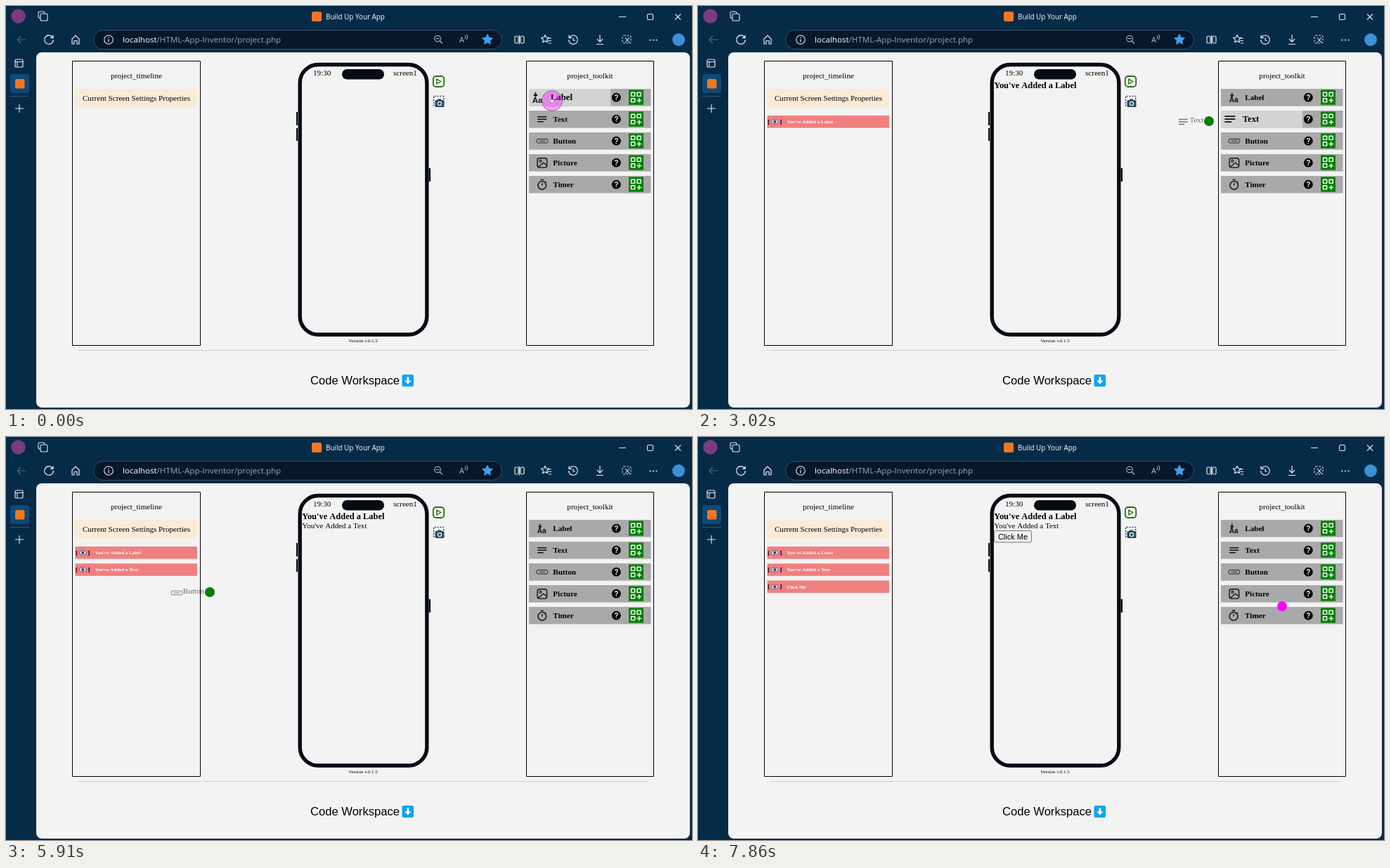
An HTML page with a canvas that plays this animation: 976x574 px, repeating every 8 s.

```html
<!DOCTYPE html>
<html lang="en">
<head>
<meta charset="utf-8">
<title>Build Up Your App</title>
<style>
  html, body { margin: 0; width: 100%; height: 100%; overflow: hidden; background: #052b47; }
  canvas { display: block; }
</style>
</head>
<body>
<canvas id="stage" width="976" height="574"></canvas>
<script>
const c = document.getElementById('stage').getContext('2d');
const LOOP = 8000;
const SERIF = '"Liberation Serif", "Times New Roman", serif';
const SANS = '"Liberation Sans", Arial, sans-serif';
const UI = '"Open Sans", "Noto Sans", sans-serif';
const PAGE = '#f3f3f3', INK = '#050c14', CHROME = '#e4eaef';

// Pointer positions: time, x, y. Each one holds until the next.
const PATH = [
  [0, 777, 135], [370, 765, 134], [490, 739, 139], [640, 713, 141], [790, 650, 146],
  [910, 601, 150], [1060, 561, 151], [1210, 531, 154], [1890, 597, 160], [2040, 685, 158],
  [2190, 783, 165], [2340, 804, 166], [2610, 803, 166], [2900, 775, 165], [3020, 727, 164],
  [3160, 700, 165], [3280, 650, 167], [3400, 590, 169], [3520, 534, 171], [4230, 570, 172],
  [4350, 618, 174], [4500, 690, 174], [4630, 770, 183], [4760, 781, 188], [4910, 774, 188],
  [5280, 772, 189], [5400, 680, 194], [5520, 589, 201], [5670, 490, 208], [5790, 390, 215],
  [5910, 290, 221], [6040, 205, 226], [6160, 171, 227], [6280, 211, 226], [7310, 448, 243],
  [7460, 725, 245], [7610, 833, 245], [7730, 832, 243], [7860, 831, 241]
];
const DRAGS = [
  { press: 120, lift: 370, drop: 1340 },
  { press: 2610, lift: 2900, drop: 3800 },
  { press: 4910, lift: 5280, drop: 6680 }
];
const HOVERS = [
  { on: 0, lit: 0, out: 640, end: 790 },
  { on: 2190, lit: 2900, out: 3160, end: 3280 },
  { on: 4630, lit: 4760, out: 5520, end: 5670 }
];
// Times at which the pointer starts growing, is full, and shrinks back.
const GROWS = [[0, 0, 490], [2190, 2340, 3020], [4630, 4760, 5400], [6680, 6810, 7310]];

const TOOLS = ['Label', 'Text', 'Button', 'Picture', 'Timer'];
const ITEMS = ["You've Added a Label", "You've Added a Text", 'Click Me'];

const within = (t, a, b) => t >= a && t < b;

function text(s, x, y, font, color = '#000', align = 'left') {
  c.font = font;
  c.fillStyle = color;
  c.textAlign = align;
  c.fillText(s, x, y);
}
function rect(x, y, w, h, color) {
  c.fillStyle = color;
  c.fillRect(x, y, w, h);
}
function paint(fill, stroke, width = 1) {
  if (fill) { c.fillStyle = fill; c.fill(); }
  if (stroke) { c.strokeStyle = stroke; c.lineWidth = width; c.stroke(); }
}
function round(x, y, w, h, r, fill, stroke, width) {
  c.beginPath();
  c.roundRect(x, y, w, h, r);
  paint(fill, stroke, width);
}
function disc(x, y, r, fill, stroke, width) {
  c.beginPath();
  c.arc(x, y, r, 0, Math.PI * 2);
  paint(fill, stroke, width);
}
function path(d, x, y, stroke, width = 1.2, fill) {
  c.save();
  c.translate(x, y);
  const p = new Path2D(d);
  if (fill) { c.fillStyle = fill; c.fill(p); }
  if (stroke) {
    c.strokeStyle = stroke;
    c.lineWidth = width;
    c.lineJoin = 'round';
    c.stroke(p);
  }
  c.restore();
}
function star(x, y, r, fill, stroke) {
  c.beginPath();
  for (let i = 0; i < 10; i++) {
    const a = -Math.PI / 2 + i * Math.PI / 5, k = i % 2 ? r * .48 : r;
    c.lineTo(x + k * Math.cos(a), y + k * Math.sin(a));
  }
  c.closePath();
  c.lineJoin = 'round';
  paint(fill, stroke, 1.2);
}

function drawBrowser() {
  rect(0, 0, 976, 574, '#052b47');
  disc(17.5, 14.5, 10.2, '#7b3a82');
  round(46, 8, 9, 9, 2, null, CHROME, 1.1);
  round(49, 11, 10, 10, 2, '#052b47', CHROME, 1.1);
  round(435, 8, 14, 14, 2.5, '#f37623');
  text('Build Up Your App', 455, 19, '9.9px ' + UI, '#fff');
  path('M-5 0H5', 877, 15.5, CHROME, 1);
  round(912.5, 11.5, 8, 8, 1.5, null, CHROME, 1.1);
  path('M-4-4L4 4M4-4L-4 4', 956, 15.5, CHROME, 1.1);

  path('M7 0H-6M-1-5L-6 0L-1 5', 22, 48, '#4f687b');
  path('M5.5-3A6.3 6.3 0 1 0 6.3 0M6-6.5V-2.7H2', 61, 48, CHROME, 1.3);
  path('M-5-1L0-6L5-1V6H2V1.5H-2V6H-5Z', 99, 48, CHROME, 1.2);

  round(124.5, 34.5, 581, 27, 13.5, '#07182a', '#3a5064');
  disc(146, 48, 6.3, null, CHROME, 1.1);
  path('M0-.8V3.4M0-3.4V-2.1', 146, 48, CHROME, 1.2);
  text('localhost', 166, 52, '11.6px ' + UI, '#fff');
  const w = c.measureText('localhost').width;
  text('/HTML-App-Inventor/project.php', 166 + w, 52, '11.6px ' + UI, '#9aa8b4');
  disc(614, 46.5, 4.3, null, '#b4c0ca', 1.1);
  path('M3 3L7 7M-2.3 0H2.3', 614, 46.5, '#b4c0ca', 1.1);
  text('A', 645, 52, '11px ' + UI, '#b4c0ca');
  path('M0-3Q1.8-1 0 2M2.5-4.5Q5-1 2.5 3', 653, 45, '#b4c0ca', 1);
  star(685, 48, 7.5, '#3f9ff0', '#3f9ff0');

  round(724, 43, 5, 10, 1.5, null, CHROME, 1.2);
  round(732, 43, 5, 10, 1.5, null, CHROME, 1.2);
  path('M0-6.5V6.5', 730.5, 48, CHROME, 1);
  star(767, 47, 5.8, null, CHROME);
  path('M1-1H7M2 2.5H7M3 6H7', 769, 47, CHROME, 1.2);
  path('M-5.5-3A6.3 6.3 0 1 1-6.3 0M-6-6.5V-2.7H-2M0-3V1H3', 807, 48, CHROME);
  path('M0-7V3M-4-1L0 3.2L4-1M-5 6.5H5', 845, 48, CHROME);
  c.setLineDash([2.5, 2]);
  round(877, 42, 12, 11, 2, null, CHROME, 1.1);
  c.setLineDash([]);
  path('M-3-3L3 4M3-3L-3 4', 884, 48, CHROME, 1.1);
  for (const x of [916.5, 921, 925.5]) disc(x, 48.5, 1.1, CHROME);
  disc(957, 48, 9, '#3f8fd8');

  round(13, 76, 11, 11, 2, null, CHROME, 1.2);
  path('M-5-2H6M-2-2V5', 18, 81.5, CHROME, 1.1);
  round(6, 97, 27, 27, 4, '#0d4a78');
  round(13, 104, 13.5, 13.5, 2.5, '#f37623');
  rect(6, 128, 27, 1, '#3d586c');
  path('M-6 0H6M0-6V6', 19, 146, CHROME, 1.1);
}

function drawPhone() {
  rect(413, 151, 2, 19, INK);
  rect(413, 174, 2, 18, INK);
  rect(601.5, 231, 2.5, 19, INK);
  round(418.2, 83.5, 180.6, 384.5, 26, PAGE, INK, 5.4);
  round(478, 90, 60, 14.5, 7.2, INK);
  text('19:30', 437, 98.5, '11.1px ' + SERIF);
  text('screen1', 551, 98.5, '11.1px ' + SERIF);
  text('Version v.0.1.5', 508, 479, '6.9px ' + SERIF, '#000', 'center');

  const green = '#2a6b1f', slate = '#2b4a5a';
  round(607.8, 100, 15.4, 15, 4, '#eaf6e4', green, 1.8);
  path('M-2.5-3.5L3.5 0L-2.5 3.5Z', 615.3, 107.5, green, 1.4);
  c.setLineDash([2, 1.8]);
  path('M-7 7V-7H7V-1', 615.5, 135.5, slate, 1.6);
  c.setLineDash([]);
  round(610.5, 134, 13, 10, 1.5, slate);
  rect(614, 132.5, 5, 2, slate);
  disc(617, 139, 2.6, slate, PAGE, 1.3);
}

function drawPage() {
  round(43, 66, 930, 506, 8, PAGE);
  c.strokeStyle = '#000';
  c.lineWidth = 1;
  c.strokeRect(94.5, 78.5, 182, 405);
  c.strokeRect(740.5, 78.5, 181, 405);
  text('project_timeline', 185.5, 103, '11.1px ' + SERIF, '#000', 'center');
  text('project_toolkit', 831, 103, '11.1px ' + SERIF, '#000', 'center');
  rect(98, 118, 174, 27, '#faebd7');
  text('Current Screen Settings Properties', 185.5, 135, '11.1px ' + SERIF, '#000', 'center');
  rect(102, 490, 812, 1, '#cfcfcf');
  text('Code Workspace', 433, 539, '16.6px ' + SANS);
  round(563.5, 525, 16.5, 17, 2, '#0ea5f0');
  path('M-1.4-5H1.4V0H4.6L0 5L-4.6 0H-1.4Z', 571.8, 533.5, null, 0, '#fff');
}

const icons = [
  (x, y) => {
    text('Aa', x - 7, y + 7, 'bold 10px ' + SANS, '#111');
    path('M0-6.5V-2M-2.3-3.5L0-1.4L2.3-3.5', x - 3, y, '#111', 1.5);
  },
  (x, y) => path('M-6.5-3.5H6.5M-6.5 0H6.5M-6.5 3.5H2', x, y, '#111', 1.5),
  (x, y) => {
    round(x - 7.5, y - 2.8, 15.5, 5.6, 1.5, null, '#222', 1);
    path('M-4 0H4.5', x, y, '#222', 1);
  },
  (x, y) => {
    round(x - 6.7, y - 6.5, 13.6, 13.4, 3, null, '#111', 1.4);
    disc(x - 2.3, y - 2.3, 1.5, null, '#111', 1.1);
    path('M-5.5 6L2 0L6.5 3.5', x, y, '#111', 1.3);
  },
  (x, y) => {
    disc(x, y + 1.2, 5.8, null, '#111', 1.5);
    path('M-2.2-6.8H2.2M0 1.2V-2M4.6-4.2L5.8-3', x, y, '#111', 1.4);
  }
];

function hoverOf(i, t) {
  if (i === 4) return { amount: t >= 7860 ? .1 : 0, lit: false };
  const h = HOVERS[i];
  if (!h || !within(t, h.on, h.end)) return { amount: 0, lit: false };
  return { amount: t < h.out ? 1 : .4, lit: within(t, h.lit, h.out) };
}

function drawTool(i, t) {
  const y = 118 + 31 * i, mid = y + 12.2;
  const { amount, lit } = hoverOf(i, t);
  rect(744, y, 173.5, 24.6, '#a9a9a9');
  if (lit) rect(744, y, 116, 24.6, '#d3d3d3');

  const k = 1 + .15 * amount;
  c.save();
  c.translate(802, mid);
  c.scale(k, k);
  icons[i](-39.3, 0);
  text(TOOLS[i], -23.7, 3.6, 'bold 11.1px ' + SERIF);
  c.restore();

  disc(868.3, mid, 6.4, '#000');
  text('?', 868.3, mid + 3.7, 'bold 10px ' + SANS, '#fff', 'center');
  rect(886, y + 1.5, 21, 21.2, '#008000');
  for (const [dx, dy] of [[-7, -7], [1.5, -7], [-7, 1.5]])
    round(896.5 + dx, mid + dy, 5.2, 5.2, .5, null, '#fff', 1.4);
  path('M-3.2 0H3.2M0-3.2V3.2', 900.8, mid + 4.3, '#fff', 1.4);
}

function itemColor(i, t) {
  if (i < 2 || t >= 7610) return '#f08080';
  return t < 7310 ? '#80407f' : t < 7460 ? '#a8607f' : '#d07080';
}

function drawItem(i, t) {
  const y = 156 + 24.2 * i, mid = y + 8.8;
  rect(98.5, y, 173.5, 17.6, itemColor(i, t));
  text('[', 99, mid + 2.8, 'bold 9px ' + SERIF);
  text(']', 116.5, mid + 2.8, 'bold 9px ' + SERIF);
  c.beginPath();
  c.ellipse(109.3, mid, 4.8, 3.1, 0, 0, Math.PI * 2);
  paint('#e4e0ee', '#5d5478', 1);
  disc(109.3, mid, 2, '#38406e');
  text(ITEMS[i], 126.5, mid + 2.4, 'bold 6.95px ' + SERIF, '#fff');
}

function drawAdded(i) {
  if (i === 0) text(ITEMS[0], 421.3, 117, 'bold 12.45px ' + SERIF);
  if (i === 1) text(ITEMS[1], 421.3, 130, '11px ' + SERIF);
  if (i === 2) {
    round(421.5, 133.5, 53, 16.5, 2, '#efefef', '#767676');
    text(ITEMS[2], 448, 145.6, '11px ' + SANS, '#000', 'center');
  }
}

function drawGhost(i, x, y) {
  c.save();
  c.globalAlpha = .55;
  text(TOOLS[i], x - 8, y + 2.4, '11.1px ' + SERIF, '#000', 'right');
  icons[i](x - 17 - c.measureText(TOOLS[i]).width, y + 1);
  c.restore();
}

function drawPointer(t, x, y, pressed) {
  const grow = GROWS.find(g => within(t, g[0], g[2]));
  if (!grow) return disc(x, y, 7, pressed ? '#008000' : '#ff00ff');
  const r = t < grow[1] ? 10.6 : 14.6;
  disc(x, y, r, pressed ? '#048204' : 'rgba(255,0,255,.35)',
    pressed ? '#5fae5f' : 'rgba(120,100,125,.75)', 1);
  disc(x, y, r > 12 ? 2 : 1.4, '#fff');
}

function draw(t) {
  drawBrowser();
  drawPage();
  drawPhone();
  TOOLS.forEach((_, i) => drawTool(i, t));
  DRAGS.forEach((d, i) => {
    if (t < d.drop) return;
    drawItem(i, t);
    drawAdded(i);
  });
  const [, x, y] = PATH.findLast(p => p[0] <= t);
  DRAGS.forEach((d, i) => {
    if (within(t, d.lift, d.drop)) drawGhost(i, x, y);
  });
  drawPointer(t, x, y, DRAGS.some(d => within(t, d.press, d.drop)));
}

function tick() {
  draw(performance.now() % LOOP);
  requestAnimationFrame(tick);
}
tick();
</script>
</body>
</html>
```
